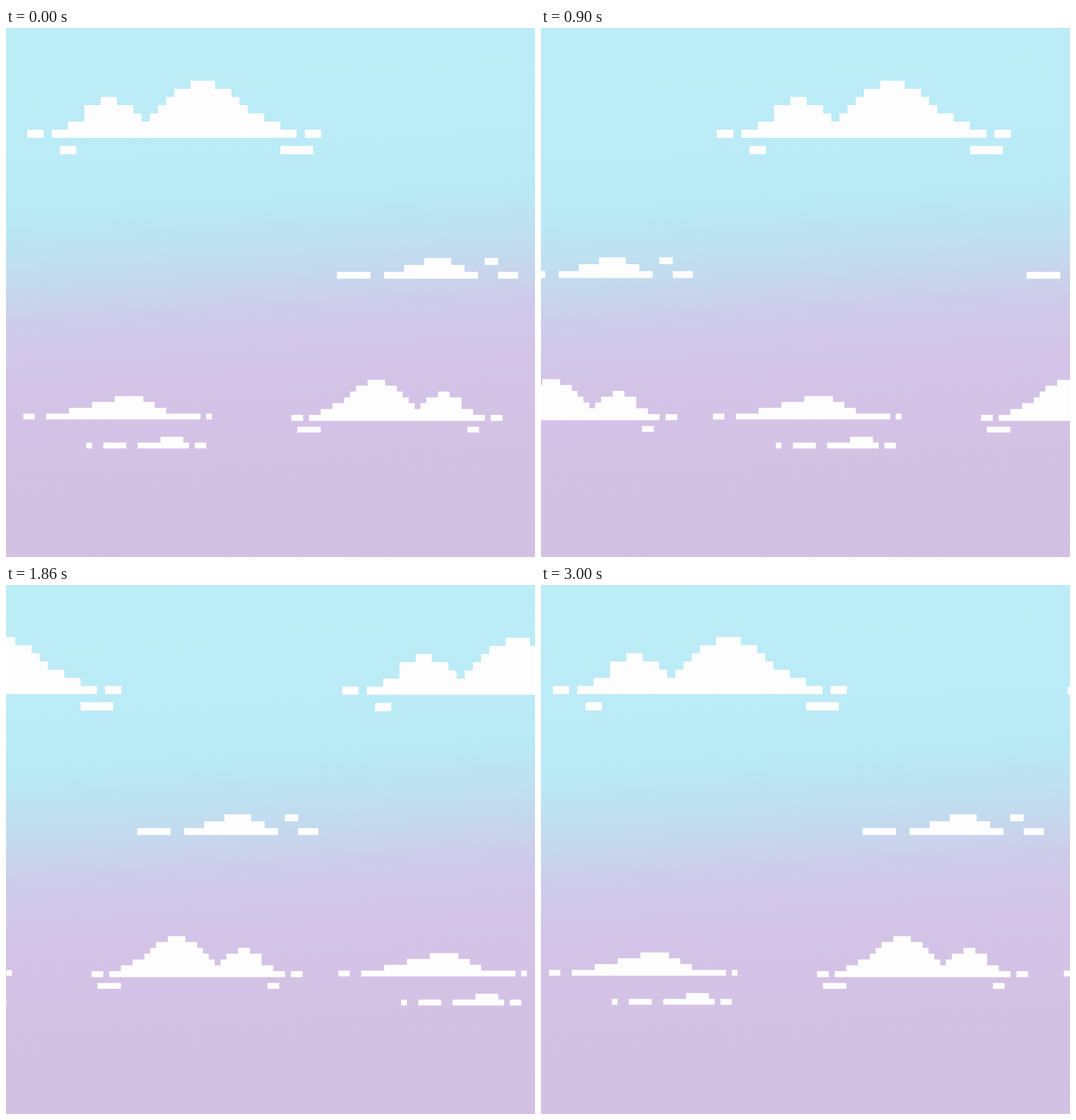
These frames come from a looping animation (748x748 px, 3060 ms). An HTML page with a canvas:

```html
<!DOCTYPE html>
<html lang="en">
<head>
<meta charset="utf-8">
<title>Drifting clouds</title>
<style>
html, body { margin: 0; width: 100%; height: 100%; overflow: hidden; }
body {
  background: linear-gradient(176.5deg, #bcecf6 0, #bbebf6 25%, #b9e9f5 34%, #bee1f1 41%,
    #c4d9ee 46.5%, #c9d3eb 50%, #cecbea 53.5%, #d0c8e8 58%, #d3c3e6 65%, #d4c2e5 78%, #d3c1e3 100%);
}
canvas { display: block; }
</style>
</head>
<body>
<canvas id="sky" width="748" height="748"></canvas>
<script>
const ctx = document.getElementById('sky').getContext('2d');
const STEP = 60, STEPS = 51, SPEED = 14.175, SPACING = 728;

// Ridges are key points [column, height] in cells, rounded into stairs.
// Dashes are [column, length, row], with rows counted up from the base.
const peaks = {
  ridge: [[3, .6], [6, 2.3], [7, 3.51], [9, 5.4], [12, 3.6], [14, 2],
    [17, 5.3], [21, 7.2], [24, 5.6], [26, 4], [32, .6]],
  dashes: [[0, 2, 0], [34, 2, 0], [4, 2, -2], [31, 4, -2]]
};
const wisp = {
  ridge: [[7, .6], [14, 2.9], [16, 2.7], [20, .6]],
  dashes: [[0, 5, 0], [24, 3, 0], [22, 2, 2]]
};
const mound = {
  ridge: [[4, .6], [16, 3.6], [20, 3.6], [24, 1.6], [30, .6]],
  dashes: [[0, 2, 0], [32, 1, 0]]
};
const streak = {
  ridge: [[20, .6], [24, 1.6], [27, 1.6], [28, .6]],
  dashes: [[11, 1, 0], [14, 4, 0], [30, 2, 0]]
};
// Base line at y; a negative cell width mirrors the shape.
const clouds = [
  { ...peaks, x: 30, y: 155.3, w: 11.55, h: 11.55 },
  { ...wisp, x: 468, y: 354.4, w: 9.49, h: 9.75 },
  { ...mound, x: 24.5, y: 553.4, w: 8.08, h: 8.2 },
  { ...streak, x: 24.5, y: 594.4, w: 8.08, h: 8.2 },
  { ...peaks, x: 702, y: 555.4, w: -8.29, h: 8.28 }
];

function heightAt(ridge, col) {
  const i = ridge.findIndex(p => p[0] > col);
  if (i < 0) return ridge[ridge.length - 1][1];
  const [c0, h0] = ridge[i - 1], [c1, h1] = ridge[i];
  return h0 + (h1 - h0) * (col - c0) / (c1 - c0);
}

function drawCloud({ ridge, dashes, x, y, w, h }) {
  const first = ridge[0][0], last = ridge[ridge.length - 1][0];
  ctx.beginPath();
  ctx.moveTo(x + first * w, y);
  for (let col = first; col <= last; col++) {
    const top = y - Math.round(heightAt(ridge, col)) * h;
    ctx.lineTo(x + col * w, top);
    ctx.lineTo(x + (col + 1) * w, top);
  }
  ctx.lineTo(x + (last + 1) * w, y);
  ctx.closePath();
  for (const [col, len, row] of dashes) {
    ctx.rect(x + col * w, y - (row + 1) * h, len * w, h);
  }
  ctx.fill();
}

function drawGroup(dx, dy) {
  ctx.setTransform(1, 0, 0, 1, dx, dy);
  clouds.forEach(drawCloud);
}

const start = performance.now();

function frame() {
  const step = Math.floor((performance.now() - start) / STEP) % STEPS;
  // Slightly quicker at first, then steady.
  const dx = SPEED * step + Math.min(step, 6);
  ctx.setTransform(1, 0, 0, 1, 0, 0);
  ctx.clearRect(0, 0, 748, 748);
  ctx.fillStyle = '#fdfdfd';
  drawGroup(dx, 0);
  // The following group enters from the left, one pixel higher.
  drawGroup(dx - SPACING, -1);
  requestAnimationFrame(frame);
}
frame();
</script>
</body>
</html>
```
